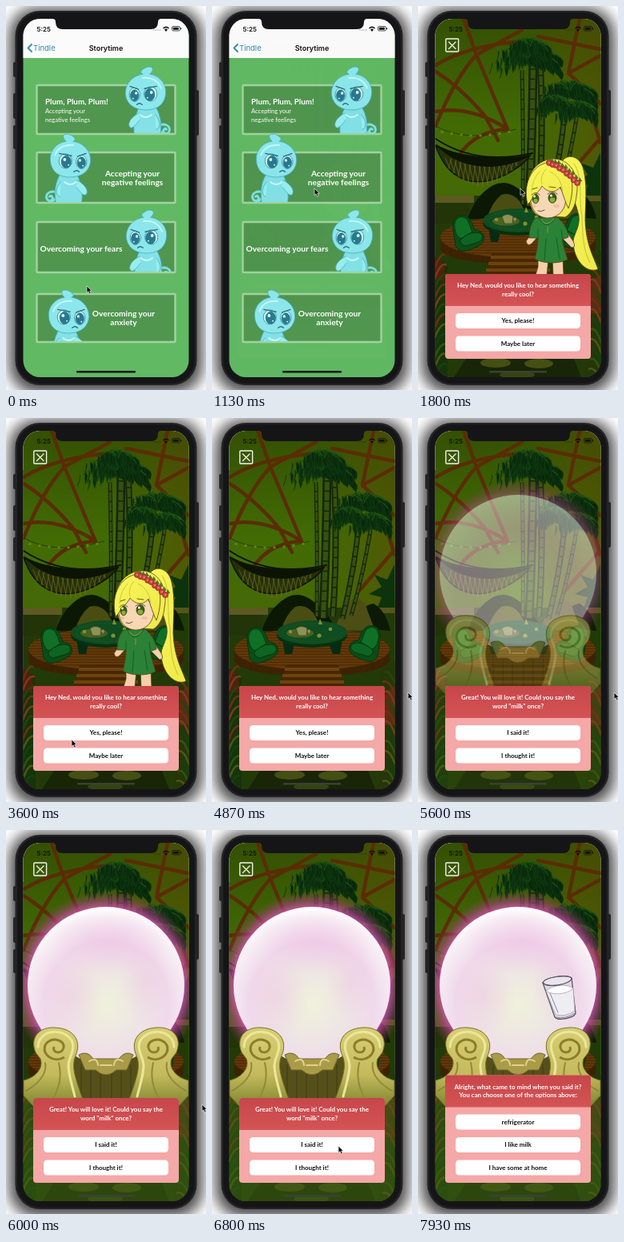
Write an HTML page that moves like this. It is 250 by 480 pixels and loops after 8000 ms.

```html
<!DOCTYPE html>
<html lang="en">
<head>
<meta charset="utf-8">
<title>Storytime</title>
<style>
html, body { margin: 0; width: 100%; height: 100%; overflow: hidden; background: #fff; }
svg { display: block; width: 250px; height: 480px; }
text { font-family: Lato, "Open Sans", sans-serif; font-weight: 700; }
.ui { font-family: Inter, Roboto, sans-serif; font-weight: 600; }
.thin text { font-weight: 400; }
.mid { text-anchor: middle; }
.line { fill: none; stroke-linecap: round; stroke-linejoin: round; }
</style>
</head>
<body>
<svg viewBox="0 0 250 480">
<defs>
  <clipPath id="screen"><rect x="21.5" y="16" width="207" height="448" rx="21"/></clipPath>
  <filter id="soft" x="-30%" y="-30%" width="160%" height="160%"><feGaussianBlur stdDeviation="9"/></filter>
  <linearGradient id="sky" x2="0" y2="1">
    <stop offset="0" stop-color="#345003"/><stop offset=".3" stop-color="#426b04"/>
    <stop offset=".55" stop-color="#456806"/><stop offset="1" stop-color="#1a3008"/>
  </linearGradient>
  <linearGradient id="dusk"><stop offset=".5" stop-color="#5a5204" stop-opacity="0"/><stop offset="1" stop-color="#5c4604" stop-opacity=".5"/></linearGradient>
  <linearGradient id="red" x2="0" y2="1"><stop offset="0" stop-color="#c6464a"/><stop offset="1" stop-color="#d45455"/></linearGradient>
  <linearGradient id="hair" x2="1" y2="1"><stop offset="0" stop-color="#f8f65c"/><stop offset="1" stop-color="#efe94a"/></linearGradient>
  <linearGradient id="gold" x2="0" y2="1"><stop offset="0" stop-color="#d8cf74"/><stop offset=".6" stop-color="#c4ba5c"/><stop offset="1" stop-color="#7f8630"/></linearGradient>
  <radialGradient id="orb" cx=".5" cy=".62" r=".62">
    <stop offset="0" stop-color="#f0f1dc"/><stop offset=".35" stop-color="#eee6e4"/>
    <stop offset=".65" stop-color="#f0d9eb"/><stop offset=".88" stop-color="#f8f0f5"/><stop offset="1" stop-color="#fff"/>
  </radialGradient>
  <radialGradient id="halo">
    <stop offset=".8" stop-color="#e35ac4" stop-opacity=".9"/><stop offset=".9" stop-color="#b43c8c" stop-opacity=".5"/>
    <stop offset="1" stop-color="#8c3c5c" stop-opacity="0"/>
  </radialGradient>
  <radialGradient id="pink"><stop offset="0" stop-color="#eeb4e0" stop-opacity=".75"/><stop offset="1" stop-color="#eeb4e0" stop-opacity="0"/></radialGradient>
  <g id="imp" stroke="#47a9ba" stroke-width=".8" stroke-linejoin="round">
    <path d="M-17 43C-34 38-34 56-25 54C-19 51-27 44-27 50M-14 48C-20 52-30 62-36 56" fill="none" stroke="#7be0e8" stroke-width="3"/>
    <path d="M-12 18C-21 31-22 50-16 66H13C18 51 17 35 9 19Z" fill="#83e1e7"/>
    <path d="M9 27C21 33 25 42 21 46C17 49 11 39 8 36M-12 29C-19 37-20 47-13 49" fill="#98edef"/>
    <path d="M-26 1C-27-14-15-23-5-24C-14-32-5-37 3-31C8-28 7-25 4-24C19-22 28-10 27 3C25 18 12 24-3 23C-17 22-25 14-26 1Z" fill="#8ce7ec"/>
    <path d="M-20-5C-16-17-5-20 5-19M-8 29C-2 34 3 34 8 29" fill="none" stroke="#c5f9f7" stroke-width="2"/>
    <g stroke="#2c7c90">
      <ellipse cx="-6" cy="2" rx="8.5" ry="9.5" fill="#d9ffff"/><ellipse cx="15" cy="3" rx="7" ry="9" fill="#d9ffff"/>
      <ellipse cx="-5" cy="3" rx="6.5" ry="8" fill="#28798e"/><ellipse cx="15" cy="4" rx="5.5" ry="7.5" fill="#28798e"/>
    </g>
    <g fill="#d9ffff" stroke="none"><circle cx="-7" cy="0" r="2"/><circle cx="13" cy="1" r="1.8"/><circle cx="-2" cy="7" r="1"/><circle cx="17" cy="8" r="1"/></g>
    <path class="line" d="M-14-8L2-5M10-4L21-8M5 16Q9 13 12 16" stroke="#286f80" stroke-width="1.5"/>
  </g>
  <g id="chair" stroke="#06300c" stroke-width=".9">
    <path d="M44 280C42 266 49 260 58 262C66 264 68 273 71 280C79 280 84 286 82 293C80 299 70 303 60 306Q51 308 47 300Z" fill="#0a4d18"/>
    <path d="M46 279C44 267 51 262 57 264C64 266 64 275 68 282L54 291Q48 289 46 279Z" fill="#0f7026"/>
    <path d="M53 292Q67 280 78 284Q84 290 76 295L59 300Q52 298 53 292Z" fill="#0e6523"/>
  </g>
  <g id="arm" stroke="#75702a" stroke-width="1">
    <path d="M37 278C29 258 43 246 61 247C85 248 95 264 87 282C81 296 87 311 96 337L90 345H34L22 332V313C39 309 47 296 43 286Z" fill="url(#gold)"/>
    <path d="M73 284C60 292 44 281 49 269C54 258 74 261 72 272C70 281 57 279 60 271" fill="none" stroke="#8c7d2c" stroke-width="3"/>
    <path class="line" d="M40 271C40 251 70 245 82 263C88 275 77 285 78 296C79 310 83 320 86 333" stroke="#ece69a" stroke-width="3"/>
    <path class="line" d="M49 291C52 306 38 319 25 326M66 291C70 308 66 324 58 337" stroke="#91893a" stroke-width="2"/>
  </g>
</defs>

<rect width="250" height="480" fill="#fff"/>
<rect x="4" y="2" width="242" height="482" rx="34" fill="#484848" filter="url(#soft)"/>
<g fill="#242426">
  <rect x="9" y="70" width="6" height="19" rx="2"/><rect x="9" y="109" width="6" height="32" rx="2"/>
  <rect x="9" y="149" width="6" height="30" rx="2"/><rect x="235" y="105" width="6" height="57" rx="2"/>
  <rect x="11.5" y="6" width="227" height="468" rx="31"/>
</g>
<rect x="14" y="8" width="222" height="464" rx="29" fill="#151517"/>

<g clip-path="url(#screen)">
  <g id="menu">
    <rect x="21" y="16" width="208" height="448" fill="#61b963"/>
    <rect x="21" y="16" width="208" height="49" fill="#fbfbfb"/>
    <path class="line" d="M32 48L27.5 52.5L32 57" stroke="#2f8cae" stroke-width="1.8"/>
    <text class="ui" x="34" y="56" font-size="9.5" fill="#2f8cae" style="font-weight:400">Tindle</text>
    <text class="ui mid" x="125" y="55.5" font-size="9" fill="#111">Storytime</text>
    <g id="cards"></g>
    <g fill="#fff">
      <text x="49" y="123" font-size="9.8">Plum, Plum, Plum!</text>
      <g class="thin" font-size="7.6"><text x="49" y="134">Accepting your</text><text x="49" y="145">negative feelings</text></g>
      <g class="mid" font-size="10.2">
        <text x="158" y="212.5">Accepting your</text><text x="158" y="223.5">negative feelings</text>
        <text x="94" y="306.5">Overcoming your fears</text>
        <text x="147" y="387.5">Overcoming your</text><text x="147" y="398.5">anxiety</text>
      </g>
    </g>
    <rect x="88" y="456" width="74" height="2.6" rx="1.3" fill="#101810"/>
  </g>

  <g id="scene">
    <rect x="21" y="16" width="208" height="448" fill="url(#sky)"/>
    <rect x="21" y="16" width="208" height="230" fill="url(#dusk)"/>
    <g class="line" stroke="#5a2c04" stroke-width="4.5">
      <path d="M22 74Q60 50 130 44M57 16L73 61L130 30M73 61L112 154M22 82Q55 103 84 138L100 168M73 61Q45 92 22 150M22 132Q66 124 112 154M44 200Q64 156 112 154M202 16L188 84M150 38L228 54M188 84L228 62M188 84L228 122M204 100Q216 128 228 171M228 165L184 216"/>
    </g>
    <path d="M21 237H229V464H21Z" fill="#223a08"/>
    <path d="M21 237H70V246H21Z" fill="#5c5a20"/><path d="M21 246H64V272H21Z" fill="#233408"/>
    <path d="M190 235H229V244H190Z" fill="#55561c"/>
    <path d="M228 183L219 202L203 196L212 211L196 220L212 224L207 237H229Z" fill="#0d330c"/>
    <path d="M62 266Q72 236 94 224Q108 217 122 226Q145 240 158 270Z" fill="#0b1804"/>
    <path d="M86 266Q92 246 104 236Q117 232 127 244L139 266Z" fill="#4a4d12"/>
    <path d="M176 262Q186 233 202 232Q217 240 223 266Z" fill="#0c1a05"/>
    <path d="M153 265Q161 240 176 226Q190 224 194 240L204 266Z" fill="#4c4e16"/>
    <g id="palms"></g>
    <g class="line">
      <path d="M22 150Q62 172 122 154" stroke="#243206" stroke-width=".8"/>
      <path d="M22 166Q73 200 143 184" stroke="#0b1303" stroke-width="2"/>
      <path d="M22 174C40 190 95 197 140 187C122 212 48 252 22 174Z" fill="#263008" stroke="#0b1303" stroke-width="1.5"/>
      <path id="net" stroke="#6f6c28" stroke-width=".7"/>
      <path d="M22 172C40 186 95 194 142 186C112 206 52 210 22 172Z" fill="#0b1404"/>
    </g>
    <g id="lamps" fill="#5f8418"></g>
    <path d="M28 288V304C37 329 211 329 222 304V288Z" fill="#3c2203"/>
    <ellipse cx="125" cy="289" rx="97" ry="26" fill="#63390a"/>
    <g id="planks" class="line" stroke="#452704" stroke-width=".9"></g>
    <path d="M92 309H158L167 345H83Z" fill="#482703"/>
    <path d="M91 314H159M88 322H162M85 330H165" stroke="#6d430e" stroke-width="4"/>
    <use href="#chair"/><use href="#chair" transform="matrix(-1 0 0 1 254 -2)"/>
    <path d="M87 270L91 295H100L103 282H146L151 295H160L164 270Z" fill="#062a12"/>
    <ellipse cx="125" cy="272" rx="44" ry="15" fill="#06300f"/><ellipse cx="125" cy="268" rx="44" ry="15" fill="#0f4c20"/>
    <ellipse cx="125" cy="268" rx="37" ry="11.500" fill="none" stroke="#30602a" stroke-dasharray="1 2"/>
    <ellipse cx="110" cy="269" rx="17" ry="5.500" fill="#4c6021"/>
    <path d="M105 263Q112 258 119 263L118 272H108ZM118 265Q126 262 122 270" fill="#8d9255" stroke="#3c4c20" stroke-width=".8"/>
    <g fill="#85902a"><circle cx="98" cy="267" r="2.300"/><circle cx="134" cy="272" r="2.600"/><circle cx="148" cy="264" r="2.300"/><path d="M133 258L135 251L138 258Z"/></g>
    <path d="M21 313L37 324V464H21Z" fill="#17330a"/><path d="M211 316L229 305V464H209Z" fill="#253608"/>
    <path d="M21 315Q37 318 33 343H21Z" fill="#52200c"/><path d="M229 335Q207 345 212 384H229Z" fill="#572d14"/>
    <g id="ferns" class="line"></g>
    <path d="M60 441H195L204 464H45Z" fill="#182506"/>
    <g fill="#444f14"><ellipse cx="97" cy="446" rx="19" ry="6"/><ellipse cx="151" cy="447" rx="18" ry="6"/><ellipse cx="124" cy="461" rx="22" ry="5" fill="#35440f"/></g>

    <g id="girl" stroke="#554012" stroke-width=".8" stroke-linejoin="round">
      <path d="M180 194C187 184 203 187 207 205C212 226 209 250 209 268C210 300 221 316 225 329C211 335 194 318 194 294C195 284 203 276 201 262C198 250 195 240 188 230Z" fill="url(#hair)"/>
      <path class="line" d="M195 197C207 215 200 240 205 262C206 287 206 304 215 321" stroke="#b9b422"/>
      <path d="M139 240C131 214 147 193 168 191C190 190 203 212 198 238C197 250 191 260 184 264L150 262C143 258 140 250 139 240Z" fill="url(#hair)"/>
      <path d="M150 315V326L147 336H161L163 317ZM168 317L169 336H182L181 315Z" fill="#f6cfaa"/>
      <path d="M183 278L194 294Q198 302 192 302L180 290ZM141 286L135 294Q137 302 143 296L150 288Z" fill="#f6cfaa"/>
      <path d="M147 265L174 264C184 272 188 283 188 289L180 292C182 302 185 310 187 317C175 323 155 322 146 316C149 305 150 296 150 290L139 290C139 278 142 270 147 265Z" fill="#2b8136"/>
      <path class="line" d="M152 266Q160 282 172 265M150 279L150 291M179 280L181 294M160 291L158 318M173 290L177 316" stroke="#125323"/>
      <path class="line" d="M154 267Q160 278 170 266M162 276V283" stroke="#b1a13b"/>
      <path d="M141 235C139 255 150 265 163 265C177 264 185 254 185 239C173 213 149 217 141 235Z" fill="#f8d7b5"/>
      <path d="M137 248C130 219 145 195 168 195C193 196 198 224 188 253C184 245 181 235 178 226C171 235 162 233 155 225C151 233 145 236 140 245Z" fill="url(#hair)"/>
      <path class="line" d="M152 207Q143 216 142 232M160 204Q152 213 155 223M165 207Q178 212 181 231" stroke="#c4bd2d"/>
      <g fill="#385d16" stroke="#2b3d12"><ellipse cx="147" cy="241" rx="4" ry="5.800"/><ellipse cx="168" cy="240" rx="5" ry="6.200"/></g>
      <g fill="#8cae35" stroke="none"><ellipse cx="147" cy="243.500" rx="2.600" ry="2.800"/><ellipse cx="168" cy="242.500" rx="3.300" ry="3"/></g>
      <g fill="#fff" stroke="none"><circle cx="145.500" cy="238" r="1.400"/><circle cx="166.400" cy="237" r="1.500"/></g>
      <path class="line" d="M142 236Q147 231 152 236M162 235Q168 230 174 235M143 229L149 227M164 226L172 227M150 256Q154 258 158 255" stroke="#453312"/>
      <g fill="#ef9c83" stroke="none" opacity=".4"><ellipse cx="145" cy="250" rx="3" ry="1.800"/><ellipse cx="173" cy="250" rx="4" ry="2"/></g>
      <g id="band"></g>
    </g>

    <g id="ball">
      <path d="M22 322Q67 295 125 304T228 322V464H22Z" fill="#3f6214" opacity=".55"/>
      <circle cx="125" cy="194" r="118" fill="url(#halo)"/>
      <circle cx="125" cy="194" r="98" fill="url(#orb)"/>
      <ellipse cx="130" cy="140" rx="74" ry="42" fill="url(#pink)" opacity=".55"/>
      <ellipse cx="82" cy="207" rx="40" ry="52" fill="url(#pink)" opacity=".4"/>
      <ellipse cx="174" cy="190" rx="32" ry="54" fill="url(#pink)" opacity=".35"/>
      <path d="M82 280Q125 307 168 280L161 337H89Z" fill="#55501a"/>
      <path d="M94 293V335M106 299V335M118 302V335M132 302V335M144 299V335M156 293V335" stroke="#3f3a14"/>
      <path d="M91 281Q102 275 109 286H141Q149 275 159 281L151 300H138Q125 312 112 300H99Z" fill="#a99b48" stroke="#6e6426"/>
      <path class="line" d="M104 289Q114 283 115 294M146 289Q136 283 135 294M118 294H132" stroke="#ddd587" stroke-width="2"/>
      <use href="#arm"/><use href="#arm" transform="matrix(-1 0 0 1 250 0)"/>
    </g>
    <g id="glass" stroke="#50505d" stroke-width="1.2" stroke-linejoin="round">
      <path d="M156 191C158 184 186 180 192 185L197 229C195 235 176 239 171 234Z" fill="#dcd7e3" fill-opacity=".8"/>
      <path d="M160 201Q177 192 194 198L196 226Q185 234 172 231Z" fill="#eeedf2" stroke="#a5a1b0" stroke-width=".8"/>
      <path d="M160 201C169 193 188 192 194 198C186 206 167 207 160 201Z" fill="#fbfafd" stroke="#a5a1b0" stroke-width=".8"/>
      <path d="M156 191C158 184 186 180 192 185C192 193 162 198 156 191Z" fill="#f0edf5" fill-opacity=".6"/>
      <path class="line" d="M165 204L175 228M172 234Q185 237 196 229" stroke="#8b8796" stroke-width="1"/>
    </g>
    <rect x="34.8" y="41" width="15.8" height="16" rx="1" fill="none" stroke="#f3f3e8" stroke-width="1.4"/>
    <path class="line" d="M38.500 45L47 53.500M47 45L38.500 53.500" stroke="#f3f3e8" stroke-width="1.3"/>
    <rect x="89" y="456" width="72" height="2.6" rx="1.3" fill="#3b4036"/>
    <g id="popups"></g>
  </g>

  <path d="M58 16H194Q190 16 190 20Q190 29 181 29H71Q62 29 62 20Q62 16 58 16Z" fill="#151517"/>
  <g fill="#111">
    <text class="ui" x="38.5" y="31.5" font-size="8">5:25</text>
    <g opacity=".45"><circle cx="185" cy="30" r=".7"/><circle cx="187.5" cy="30" r=".7"/><circle cx="190" cy="30" r=".7"/><circle cx="192.5" cy="30" r=".7"/></g>
    <path d="M196 27.5Q200 23.5 204 27.5L203 28.5Q200 26 197 28.5ZM198 29.5Q200 27.5 202 29.5L200 32Z"/>
    <rect x="207.5" y="25.5" width="10" height="5.5" rx="1.5" fill="none" stroke="#111" stroke-width=".7"/>
    <rect x="208.8" y="26.8" width="7" height="3" rx=".5"/><rect x="218.3" y="27.3" width="1" height="2"/>
  </g>
</g>
<path id="cursor" d="M0 0V8.500L2 6.800L3.500 10L5.200 9.200L3.700 6.200H6.300Z" fill="#080808" stroke="#eee" stroke-width=".7"/>
</svg>

<script>
const $ = id => document.getElementById(id);
const fill = (id, html) => { $(id).innerHTML = html; };
const times = (n, fn) => Array.from({ length: n }, (_, i) => fn(i)).join("");

// top, height, creature x, y, facing
const cards = [[99, 61, 175, 108, -1], [183, 63, 80, 192, 1], [270, 63, 176, 287, -1], [360, 60, 78, 387, 1]];
fill("cards", cards.map(([y, h, cx, cy, dir], i) => `
  <clipPath id="c${i}"><path d="M38 ${y - 30}H212V${y + h - 1}H38Z"/></clipPath>
  <rect x="38.5" y="${y}" width="173" height="${h}" rx="1" fill="#50964f" stroke="#a1d3a0" stroke-width="2.4"/>
  <g clip-path="url(#c${i})"><use href="#imp" transform="translate(${cx} ${cy}) scale(${dir * .95} .95)"/></g>`).join(""));

function frond(x, y, angle, len) {
  const dx = Math.cos(angle) * len, dy = Math.sin(angle) * len * .6;
  const leaves = times(7, i => {
    const u = (i + 1) / 7;
    const px = x + dx * u, py = y + dy * u - 18 * u * (1 - u) + 6 * u * u;
    const tx = px + dx * .12 + Math.sin(i * 3) * 3, ty = py + 13 + 5 * Math.sin(u * 3);
    return `M${px - 4} ${py}Q${tx + 5} ${py + 2} ${tx} ${ty}Q${px - 4} ${py + 9} ${px - 4} ${py}`;
  });
  return `<path d="${leaves}" fill="#08260b" stroke="#123d12" stroke-width=".6"/>
    <path class="line" d="M${x} ${y}Q${x + dx / 2} ${y + dy / 2 - 11} ${x + dx} ${y + dy + 6}" stroke="#1e5214" stroke-width="1.2"/>`;
}
const trunk = (d, w) => `<path d="${d}" fill="none" stroke="#13270a" stroke-width="${w}"/>
  <path d="${d}" fill="none" stroke="#38500f" stroke-width="${w * .55}" stroke-dasharray="11 1.5"/>`;
const crown = (x, y, len) => times(13, i => frond(x, y, Math.PI * (.9 + i * 5 % 13 * .1), len * (.75 + i % 3 * .12)));
fill("palms", trunk("M144 67Q143 160 139 250", 11) + trunk("M153 75Q157 170 151 248", 8)
  + trunk("M130 80Q132 170 131 248", 5) + trunk("M185 112Q181 178 163 251", 7) + trunk("M201 122Q192 185 174 247", 5)
  + crown(190, 106, 34) + crown(138, 65, 42) + crown(140, 50, 26) + crown(200, 128, 24) + crown(172, 120, 20));

$("net").setAttribute("d", times(15, i => {
  const x = 34 + i * 6, y = 190 + 9 * Math.sin(i / 14 * Math.PI);
  const h = 6 + 20 * Math.sin((i + 2) / 17 * Math.PI);
  return `M${x} ${y}l6 ${h}M${x + 8} ${y}l-4 ${h}`;
}));
fill("lamps", times(8, i => `<circle cx="${30 + i * 12}" cy="${155 + 7 * Math.sin((i + 1) / 9 * Math.PI)}" r="1.7"/>`));
fill("planks", times(13, i => {
  const y = 268 + i * 3.4, w = 97 * Math.sqrt(Math.max(0, 1 - ((y - 289) / 26) ** 2));
  return `<path d="M${125 - w} ${y}H${125 + w}"/>`;
}) + times(23, i => {
  const x = 37 + i * 8, y = 290 + 25 * Math.sqrt(1 - ((x - 125) / 98) ** 2);
  return `<path d="M${x} ${y}v8"/>`;
}));
fill("ferns", times(24, i => {
  const right = i % 2, x = right ? 229 : 21, y = 310 + i * 6.2, dir = right ? -1 : 1;
  const color = i < 13 ? ["#6b3011", "#26440a", "#7a3b1a"][i % 3] : ["#2c5610", "#104214", "#4a5812"][i % 3];
  return `<path d="M${x} ${y + 18}q${dir * 7} -20 ${dir * (12 + i % 5)} -17" stroke="${color}" stroke-width="2.5"/>`;
}));
fill("band", times(9, i => {
  const x = 164 + i * 4.4, y = 196 + 25 * (i / 8) ** 1.5 + i % 2;
  return `<path d="M${x} ${y}l3 -7l3 5Z" fill="#497b2b" stroke="none"/>
    <circle cx="${x}" cy="${y}" r="3.6" fill="#cf463f" stroke="#842b2d"/><circle cx="${x}" cy="${y}" r="1" fill="#f29b78" stroke="none"/>`;
}));

const dialogs = [
  ["Hey Ned, would you like to hear something", "really cool?", "Yes, please!", "Maybe later"],
  ["Great! You will love it! Could you say the", "word \"milk\" once?", "I said it!", "I thought it!"],
  ["Alright, what came to mind when you said it?", "You can choose one of the options above:", "refrigerator", "I like milk", "I have some at home"]
];
fill("popups", dialogs.map(([a, b, ...options]) => {
  const top = 392 - options.length * 28.5;
  return `<g class="mid" font-size="8">
    <rect x="34" y="${top}" width="182" height="${441 - top}" rx="4" fill="#f4a8a7"/>
    <path d="M34 ${top + 40}V${top + 4}q0 -4 4 -4H212q4 0 4 4V${top + 40}Z" fill="url(#red)"/>
    <text x="125" y="${top + 17}" fill="#fff">${a}</text><text x="125" y="${top + 27.5}" fill="#fff">${b}</text>
    ${options.map((label, i) => {
      const y = top + 49 + i * 28.5;
      return `<rect x="47" y="${y}" width="156" height="19" rx="4.5" fill="#fff"/>
        <text x="125" y="${y + 12}" fill="#111">${label}</text>`;
    }).join("")}</g>`;
}).join(""));

const ease = (t, a, b) => {
  const u = Math.min(1, Math.max(0, (t - a) / (b - a)));
  return u * u * (3 - 2 * u);
};
const path = [
  [70, 101, 350], [800, 128, 228], [1800, 128, 228], [2900, 85, 404], [3500, 82, 402],
  [3740, 82, 402], [4000, 86, 396], [4300, 86, 396], [4800, 245, 343], [6070, 245, 343],
  [6650, 158, 395], [7050, 158, 395], [7550, 254, 358]
];
function cursorAt(t) {
  let i = path.findIndex(p => p[0] > t);
  if (i < 0) i = path.length;
  const a = path[Math.max(0, i - 1)], b = path[Math.min(i, path.length - 1)];
  const u = a === b ? 0 : ease(t, a[0], b[0]);
  return [a[1] + (b[1] - a[1]) * u, a[2] + (b[2] - a[2]) * u];
}
const fade = (id, v) => $(id).setAttribute("opacity", v);

function draw(t) {
  fade("scene", ease(t, 1120, 1330));
  fade("girl", 1 - ease(t, 4200, 4800));
  fade("ball", ease(t, 5260, 5940));
  fade("glass", ease(t, 7350, 7800));
  const step = t < 5200 ? 0 : t < 7300 ? 1 : 2;
  [...$("popups").children].forEach((g, i) => g.setAttribute("visibility", i === step ? "inherit" : "hidden"));
  $("cursor").setAttribute("transform", `translate(${cursorAt(t)})`);
}
const start = performance.now();
function tick() {
  draw((performance.now() - start) % 8000);
  requestAnimationFrame(tick);
}
draw(0);
requestAnimationFrame(tick);
</script>
</body>
</html>
```
